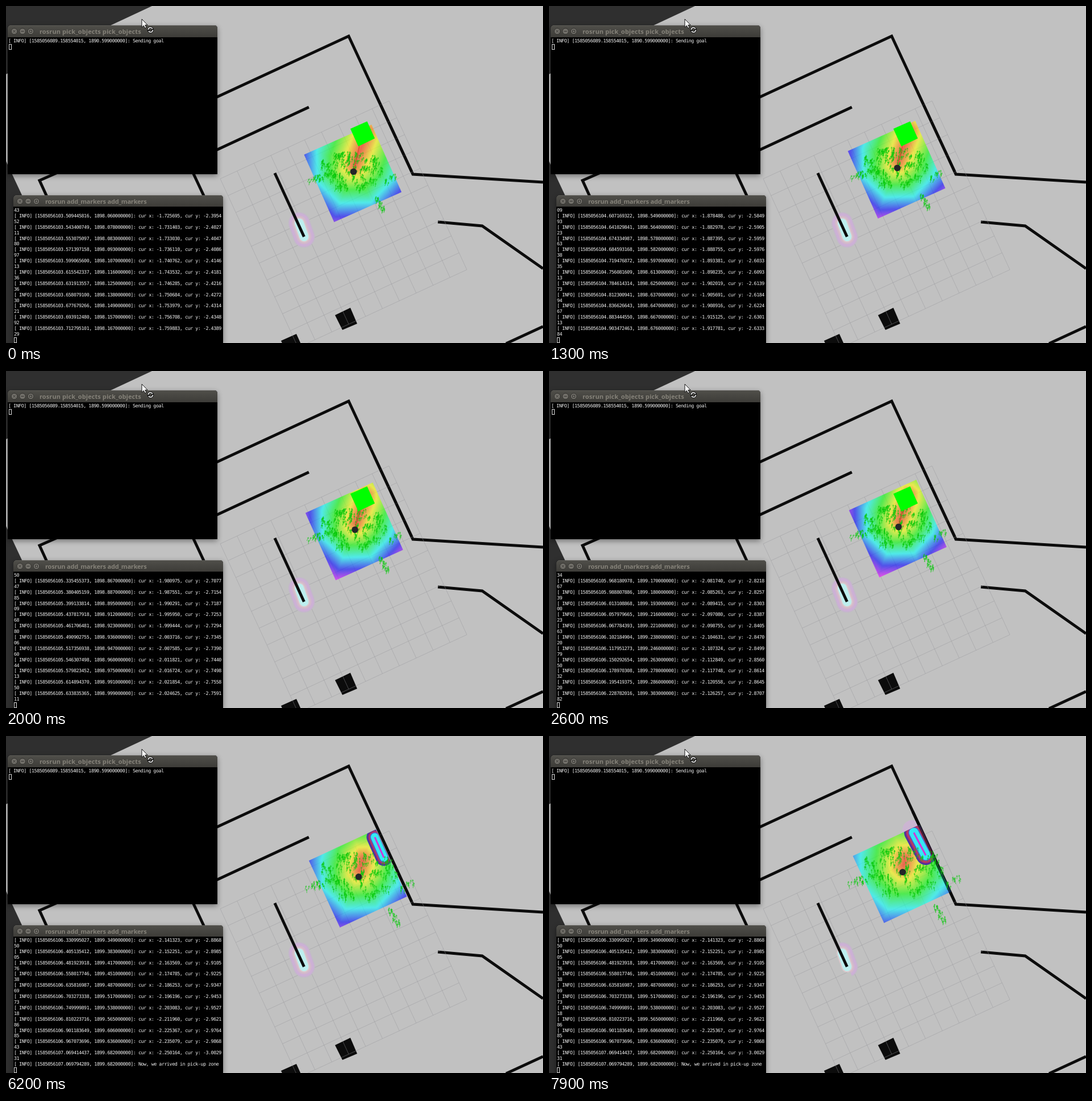
Recreate the animation shown at these times as an HTML page with a canvas. Size 945 by 593 pixels, loop 8000 ms.

```html
<!DOCTYPE html>
<html lang="en">
<head>
<meta charset="utf-8">
<title>Robot navigation</title>
<style>
  html, body { margin: 0; width: 100%; height: 100%; overflow: hidden; background: #c1c1c1; }
  #stage { position: relative; width: 100%; height: 100%; overflow: hidden; contain: strict; }
  canvas { position: absolute; left: 0; top: 0; }
  .win {
    position: absolute; width: 368.5px; background: #000; overflow: hidden;
    border-radius: 5px 5px 0 0; box-shadow: 0 3px 10px rgba(0,0,0,.42);
  }
  #pick { left: 3px; top: 34px; height: 261.5px; }
  #add { left: 13px; top: 332.5px; height: 260.5px; }
  .bar {
    height: 20.5px; border-radius: 5px 5px 0 0; position: relative;
    background: linear-gradient(#504f4a, #3d3c38); box-shadow: inset 0 1px #5c5b56;
    font: bold 11px/21px "Open Sans", "Noto Sans", sans-serif; color: #858279;
    white-space: pre; padding-left: 56px;
  }
  #pick .bar { letter-spacing: .09px; }
  #add .bar { letter-spacing: -.2px; }
  .bar svg { position: absolute; left: 0; top: 0; }
  pre {
    position: absolute; margin: 0; left: 1px; top: 22.5px; color: #f2f2f2;
    font: 8.4px/9.9px "DejaVu Sans Mono", "Liberation Mono", monospace;
    letter-spacing: -.482px; text-rendering: geometricPrecision;
  }
  .caret { position: absolute; width: 3px; height: 8px; border: 1px solid #ddd; }
  #pick .caret { left: 1.5px; top: 32.5px; }
  #add .caret { left: 1px; top: 250.5px; }
  #pointer { position: absolute; left: 236px; top: 20px; }
</style>
</head>
<body>
<div id="stage">
  <canvas id="map" width="945" height="593"></canvas>

  <div class="win" id="pick">
    <div class="bar">rosrun pick_objects pick_objects</div>
    <pre>[ INFO] [1585056089.158554015, 1890.599000000]: Sending goal</pre>
    <i class="caret"></i>
  </div>
  <div class="win" id="add">
    <div class="bar">rosrun add_markers add_markers</div>
    <pre id="log"></pre>
    <i class="caret"></i>
  </div>

  <svg id="pointer" width="28" height="32">
    <path d="M3 3V17.5L6.3 14.4L8.8 19.2L11 18L8.7 13.4H13Z" fill="#fff" stroke="#111"/>
    <circle cx="18.3" cy="22" r="4" fill="none" stroke="#111" stroke-width="3.6"/>
    <circle cx="18.3" cy="22" r="4" fill="none" stroke="#fff" stroke-width="1.6" stroke-dasharray="10 2.5"/>
  </svg>
</div>

<script>
const LOOP = 8000;
const STEPS = [0, 300, 400, ...Array.from({ length: 21 }, (_, i) => 600 + i * 100),
  5300, 5800, 6200, 6500, 6900, 7200, 7900];
const lerp = (a, b, u) => a + (b - a) * u;

let seed = 7;
const rnd = () => (seed = (seed * 16807) % 2147483647) / 2147483647;

// Values at key k, linear between the rows of a keyed list.
function sample(rows, k) {
  const i = rows.findIndex(r => r[0] > k);
  if (i < 0) return rows[rows.length - 1];
  const a = rows[i - 1], b = rows[i], u = (k - a[0]) / (b[0] - a[0]);
  return a.map((v, j) => lerp(v, b[j], u));
}

for (const bar of document.querySelectorAll('.bar')) {
  const dot = x => `<circle cx="${x}" cy="10.5" r="5.3" fill="#716f69" stroke="#33322f"/>`;
  bar.insertAdjacentHTML('beforeend', `<svg width="56" height="20">${dot(11.5)}${dot(26)}${dot(40.5)}
    <path d="M9.5 8.5l4 4m0-4l-4 4M23.5 10.5h5M38.5 8.5h4v4h-4z" fill="none" stroke="#33322f"/></svg>`);
}

// ---- log
// entry number, seconds, sim clock, x, y
const TRACK = [
  [0, 103.49771322, 898.054, 1.723722, 2.392943],
  [11, 103.712795101, 898.167, 1.759883, 2.438929],
  [51, 104.903472463, 898.676, 1.917781, 2.633384],
  [76, 105.633835365, 898.999, 2.024625, 2.759111],
  [99, 106.228782016, 899.303, 2.126257, 2.870782],
  [110, 107.069414437, 899.682, 2.250164, 3.002931],
];
// time, newest entry
const NEWEST = [[0, 11], [1300, 51], [2000, 76], [2600, 99], [5300, 111]];

const stamp = (sec, clock) => `[ INFO] [1585056${sec.toFixed(9)}, 1${clock.toFixed(3)}000000]: `;
const entries = Array.from({ length: 111 }, (_, i) => {
  const wobble = TRACK.some(r => r[0] === i) ? 0 : rnd() * .8 - .4;
  const [, sec, clock, x, y] = sample(TRACK, i + wobble);
  return stamp(sec, clock) + `cur x: -${x.toFixed(6)}, cur y: -${y.toFixed(6)}`;
});
entries.push(stamp(107.069794289, 899.682) + 'Now, we arrived in pick-up zone');

const log = document.getElementById('log');
function drawLog(t) {
  const last = Math.round(sample(NEWEST, t)[1]);
  const rows = entries.slice(last - 11, last + 1).flatMap(e => e.match(/.{1,80}/g));
  log.textContent = rows.slice(-23).join('\n');
}

// ---- map
const ctx = document.getElementById('map').getContext('2d');

function trace(pts, close) {
  ctx.beginPath();
  for (let i = 0; i < pts.length; i += 2) ctx.lineTo(pts[i], pts[i + 1]);
  if (close) ctx.closePath();
}
function fill(color, ...pts) { trace(pts, true); ctx.fillStyle = color; ctx.fill(); }
function line(color, width, cap, ...pts) {
  trace(pts);
  ctx.strokeStyle = color; ctx.lineWidth = width; ctx.lineCap = cap;
  ctx.stroke();
}
const wall = (...pts) => line('#0c0c0c', 5, 'butt', ...pts);
const capsule = (color, width, ...pts) => line(color, width, 'round', ...pts);

function drawWorld() {
  fill('#c1c1c1', 0, 0, 945, 0, 945, 593, 0, 593);
  fill('#2f2f2f', 0, 0, 257, 0, 0, 120);
  fill('#2f2f2f', 0, 273, 150, 593, 0, 593);
  wall(300, 193, 603, 53, 716, 296, 945, 310);
  wall(300, 286, 533, 178);
  wall(320, 274, 350, 338);
  wall(100, 289, 59, 307, 75, 342);
  wall(760, 380, 838, 387, 945, 462);
  wall(880, 594, 945, 564);
  fill('#0c0c0c', 579, 544, 606, 531, 618, 559, 592, 570);
  fill('#0c0c0c', 484, 589, 511, 577, 521, 599, 494, 611);
  for (let i = 0; i <= 10; i++) {
    const x = 29.7 * i, y = 13.7 * i;
    line('rgba(150,150,154,.45)', 1, 'butt', 377 + x, 304 - y, 514 + x, 601 - y);
    line('rgba(150,150,154,.45)', 1, 'butt', 377 + y, 304 + x, 674 + y, 167 + x);
  }
}

function drawHalo(late) {
  const spine = [516, 382, 524.5, 406];
  ctx.save();
  if (late) { trace([505, 350, 580, 350, 580, 440, 540, 440], true); ctx.clip(); }
  capsule('#c5b6cd', 38, ...spine);
  capsule('#cdb0d6', 34, ...spine);
  capsule('#d3b9cb', 26, ...spine);
  ctx.restore();
  capsule('#dcc8cc', 20, ...spine);
  capsule('#bdeeee', 16, ...spine);
  wall(473, 294, 524.5, 406);
  if (late) {
    capsule('rgba(208,178,216,.75)', 34, 639, 165, 660, 208);
    wall(640, 132.6, 700, 261.6);
  }
}

const N = 80, SIDE = 130;
const tile = Object.assign(document.createElement('canvas'), { width: N, height: N });
const tctx = tile.getContext('2d');

// Offset from the nearest point of the segment a-b.
function offset(x, y, a, b) {
  const dx = b[0] - a[0], dy = b[1] - a[1];
  const u = Math.max(0, Math.min(1, ((x - a[0]) * dx + (y - a[1]) * dy) / (dx * dx + dy * dy)));
  return [x - a[0] - u * dx, y - a[1] - u * dy];
}

// Rainbow by distance from the planned path, which shortens with progress p.
function drawCloud(t, p, cx, cy) {
  const th = (24 + p) * Math.PI / 180, c = Math.cos(th), s = Math.sin(th);
  const local = (x, y) => [x * c - y * s, x * s + y * c];
  const a = local(3, -14), b = local(lerp(26, 6, p), lerp(-75, -28, p));
  const n1 = local(662 - cx, 180 - cy), n2 = local(675 - cx, 213 - cy);
  const gain = 2.4 - .3 * p + .5 * Math.sin(Math.PI * p);
  const bite = t >= 5300 && t < 6200;
  const img = tctx.createImageData(N, N);
  for (let j = 0, q = 0; j < N; j++) for (let i = 0; i < N; i++, q += 4) {
    const x = ((i + .5) / N - .5) * SIDE, y = ((j + .5) / N - .5) * SIDE;
    const [ox, oy] = offset(x, y, a, b).map(Math.abs);
    let hue = 9 + gain * (Math.max(ox, oy) + .41 * Math.min(ox, oy));
    let alpha = (i + j) % 2 ? 182 : 150;
    if (bite) {
      const d = Math.hypot(...offset(x, y, n1, n2)) - 10;
      if (d < 0) alpha = 0;
      else if (d < 14) hue += (14 - d) * 11;
    }
    hue = Math.min(hue, 295) / 60;
    [5, 3, 1].forEach((n, k) => {
      const m = (n + hue) % 6;
      img.data[q + k] = 255 * (1 - .92 * Math.max(0, Math.min(m, 4 - m, 1)));
    });
    img.data[q + 3] = alpha;
  }
  tctx.putImageData(img, 0, 0);
  ctx.save();
  ctx.translate(cx, cy);
  ctx.rotate(-th);
  ctx.drawImage(tile, -SIDE / 2, -SIDE / 2, SIDE, SIDE);
  if (t >= 6200) {
    ctx.beginPath();
    ctx.rect(-SIDE / 2, -SIDE / 2, SIDE, SIDE);
    ctx.clip();
    ctx.rotate(th);
    ctx.translate(-cx, -cy);
    drawObstacle(t >= 6500);
  }
  ctx.restore();
  ctx.globalAlpha = .6;
  wall(648, 149.8, 714, 291.7);
  ctx.globalAlpha = 1;
}

function drawObstacle(wide) {
  const spine = wide ? [642, 170, 663, 210] : [649, 178, 665, 214];
  const grow = wide ? 5 : 0;
  capsule('#3f35a8', 29 + grow, ...spine);
  capsule('#7b2c86', 25 + grow, ...spine);
  capsule('#b93a62', 21 + grow, ...spine);
  capsule('#4a5fd0', 17 + grow / 2, ...spine);
  capsule('#35e8f2', 14 + grow / 2, ...spine);
  line('#d035d8', 3, 'butt', ...spine);
}

// Pose guesses: offsets from the swarm centre, in short upright stacks.
const swarm = [];
function stack(x, y, count) {
  for (let i = 0; i < count; i++) {
    swarm.push([x + rnd() * 7 - 3.5, y + rnd() * 12 - 6, rnd() * .6 - .3]);
  }
}
for (let i = 0; i < 80; i++) {
  const r = Math.sqrt(rnd()), q = rnd() * 2 * Math.PI;
  stack(Math.cos(q) * 63 * r - 2, Math.sin(q) * 37 * r - 2, 3 + Math.floor(rnd() * 4));
}
for (let i = 0; i < 3; i++) {
  stack(51 + 6 * i, 57 + 8 * i, 8);
  stack(70 + 8 * i, 20 - 5 * i, 6 - i);
  stack(-66 - 9 * i, 12 + 2 * i, 11 - 4 * i);
}

function drawSwarm(p, x, y) {
  const head = lerp(-1.32, -1.6, p), spread = .88 + .25 * p;
  ctx.strokeStyle = ctx.fillStyle = 'rgba(8,200,10,.66)';
  ctx.lineWidth = .9;
  ctx.lineCap = 'butt';
  for (const [dx, dy, turn] of swarm) {
    ctx.save();
    ctx.translate(x + dx * spread, y + dy * spread);
    ctx.rotate(head + turn);
    trace([-4, 0, 1, 0]);
    ctx.stroke();
    trace([.5, -1.7, 3.6, 0, .5, 1.7], true);
    ctx.fill();
    ctx.restore();
  }
}

// time, share of the drive done
const DRIVE = [[0, 0], [1300, .125], [2600, .33], [5300, .7], [6200, .84], [7200, 1]];

function drawMap(t) {
  const p = sample(DRIVE, t)[1];
  const cx = lerp(610.3, 621, p), cy = lerp(294.5, 242.5, p);
  const rx = cx + 1.3, ry = cy - 3;
  drawWorld();
  drawHalo(t >= 7900);
  drawCloud(t, p, cx, cy);
  drawSwarm(p, cx - 2 + 5 * p, cy - 2);
  if (t < 5300) {
    line('rgba(228,64,44,.85)', 1.5, 'butt', rx, ry, 622, 246);
    fill('#00ff00', 606, 216, 635.5, 203, 649, 233, 620, 247);
  }
  ctx.beginPath();
  ctx.arc(rx, ry, 5.8, 0, 7);
  ctx.fillStyle = '#252528';
  ctx.fill();
}

let shown = -1;
const start = performance.now();
function frame(now) {
  const t = Math.max(0, now - start) % LOOP;
  const step = STEPS.filter(s => s <= t).pop();
  if (step !== shown) {
    shown = step;
    drawLog(step);
    drawMap(step);
  }
  requestAnimationFrame(frame);
}
frame(start);
</script>
</body>
</html>
```
